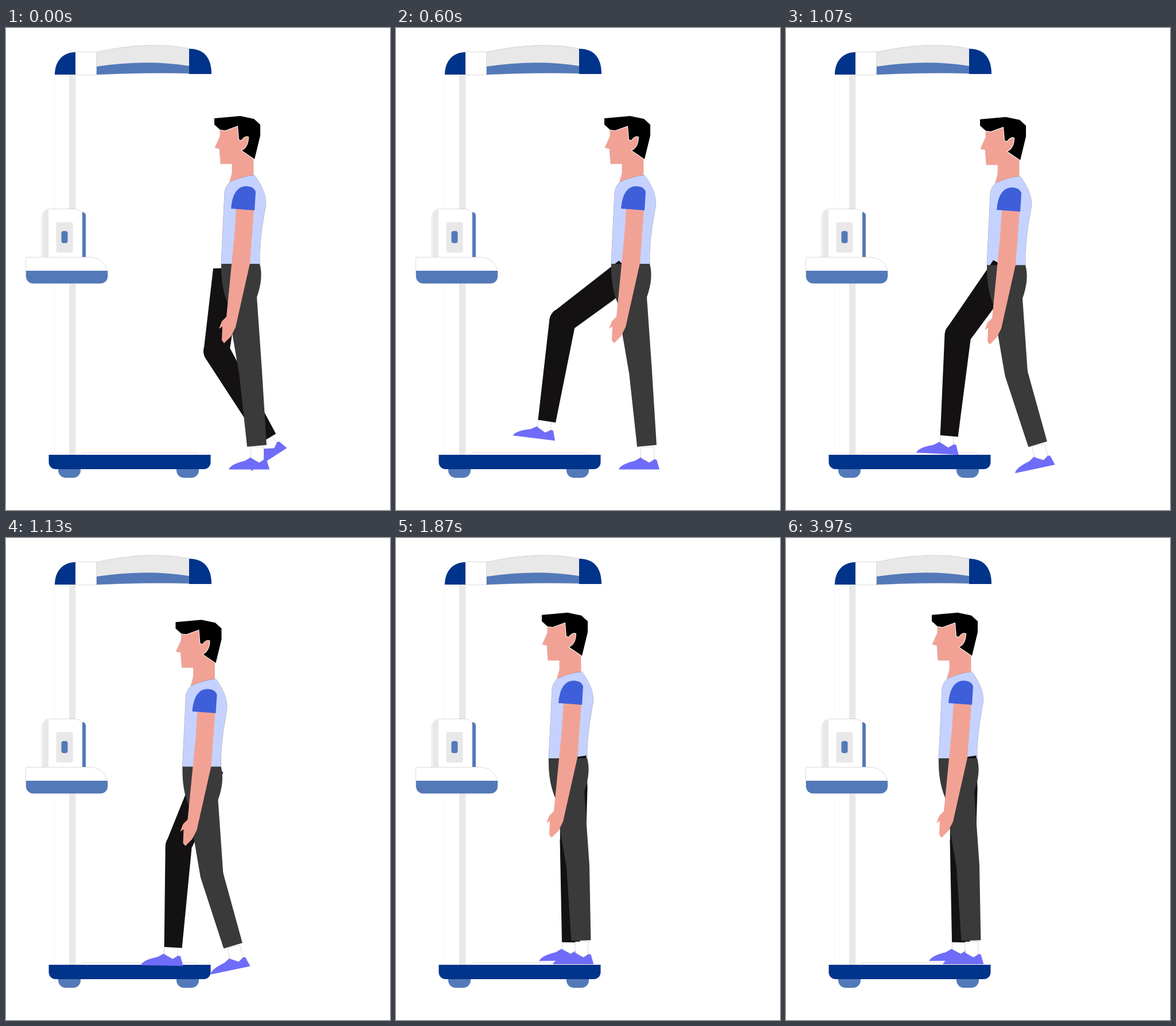
These frames come from a looping animation (669 by 838 pixels, 4010 ms). An HTML page with a canvas:

```html
<!DOCTYPE html>
<html lang="en">
<head>
<meta charset="utf-8">
<title>Stepping onto the scale</title>
<style>
html, body { margin: 0; width: 100%; height: 100%; overflow: hidden; background: #fff; }
canvas { display: block; }
</style>
</head>
<body>
<canvas id="stage" width="669" height="838"></canvas>
<script>
const ctx = document.getElementById('stage').getContext('2d');
const LOOP = 4010, RAD = Math.PI / 180;
const NAVY = '#00338a', BLUE = '#5379b9', GREY = '#e8e8e8', LINE = '#999';
const SKIN = '#f2a294', BLACK = '#131112', TROUSER = '#3a3a3a', SHOE = '#6f6cfa';

// Easing over the span from a to b, each running 0 to 1
const span = (t, a, b) => Math.min(1, Math.max(0, (t - a) / (b - a)));
const easeIn = (t, a, b, power) => span(t, a, b) ** power;
const easeOut = (t, a, b, power) => 1 - (1 - span(t, a, b)) ** power;
const smooth = (t, a, b) => {
  const u = span(t, a, b);
  return u * u * (3 - 2 * u);
};

function shape(d, fill, stroke, width = 0.7) {
  const p = new Path2D(d);
  if (stroke) {
    ctx.strokeStyle = stroke;
    ctx.lineWidth = width;
    ctx.stroke(p);
  }
  ctx.fillStyle = fill;
  ctx.fill(p);
}
function box(x, y, w, h, radius, fill, stroke) {
  const p = new Path2D();
  p.roundRect(x, y, w, h, radius);
  shape(p, fill, stroke);
}
function at(x, y, deg, draw) {
  ctx.save();
  ctx.translate(x, y);
  ctx.rotate(deg * RAD);
  draw();
  ctx.restore();
}
// Tapered lower leg hanging from a rounded knee
function shin(length, knee, ankle, fill) {
  shape(`M${-knee} 0L${-ankle} ${length}H${ankle}L${knee} 0A${knee} ${knee} 0 0 0 ${-knee} 0Z`, fill);
}

function machine() {
  box(85, 81, 36, 661, 0, '#fff', '#e6e6e6');
  box(110, 81, 11, 661, 0, GREY);

  box(121, 42, 37, 39, 0, '#fff', LINE);
  shape('M158 42Q250 22 319 36V79Q240 77 158 81Z', GREY, LINE);
  shape('M158 67Q245 54 319 66V79Q240 77 158 81Z', BLUE);
  shape('M121 42C100 42 85 57 85 81H121Z', NAVY);
  shape('M319 36C345 36 358 52 358 80H319Z', NAVY);

  box(63, 315, 70, 84, [12, 12, 0, 0], '#fff', LINE);
  box(64, 316, 10, 82, [10, 0, 0, 0], GREY);
  box(133, 320, 6, 78, [0, 6, 0, 0], BLUE);
  box(87.5, 337.5, 29, 53, 3, GREY);
  box(96.5, 353, 11, 21, 4, BLUE);
  box(35, 399, 142, 45, [0, 29, 12, 12], '#fff', LINE);
  box(35, 422, 142, 22, [0, 0, 12, 12], BLUE);

  for (const x of [91, 297]) box(x, 762, 39, 20, [0, 0, 13, 13], BLUE);
  box(133, 738.5, 198, 5, 0, '#fff', LINE);
  box(74.5, 742, 282, 25, [0, 0, 12, 12], NAVY);
}

function foot() {
  shape('M-49 41Q-46 32 -21 26L-9 19L17 24L22 41Z', SHOE);
  shape('M-10 2H12V24L4 29L-10 21Z', '#fff', LINE);
}

function farLeg(x, y, thigh, calf) {
  const knee = new DOMPoint(-24, 118).matrixTransform(new DOMMatrix().rotate(thigh));
  at(x + knee.x, y + knee.y, calf, () => {
    at(-5, 167, -2, () => { ctx.scale(1.04, 1); foot(); });
    shin(176, 23, 15.5, BLACK);
  });
  at(x, y, thigh, () => shape('M-30 -26L-47 120L-1 114L12 30L17 -27Z', BLACK));
}

function head() {
  shape('M373 176V188L364 208L372 210L374 236H394V252L389 270H412L431 260V226L412 212Q426 208 424 188L404 168Z', SKIN, '#a87870', 0.5);
  shape('M363 157L408 153L432 158L443 168V187L433 228L411 213Q423 207 423 189Q416 186 410 195L406 194L404 170L382 178L373 177L363 168Z', '#000', '#fff', 2);
}

function shirt() {
  shape('M390 268Q383 274 381 285L375 411H442Q440 375 451 316Q458 290 433 256Q412 258 390 268Z', '#c5d2ff', '#778');
}

function nearLeg(calf, tilt) {
  at(426, 598, calf, () => {
    shin(129, 20, 17, TROUSER);
    at(0, 129, tilt - calf, foot);
  });
  shape('M375 410H442Q449 434 437 468L446 597L406 600L394 530L386 478Q374 450 375 410Z', TROUSER);
}

function arm() {
  shape('M401 313L432 315L425 409L400 520L392 536L380 548L376 543L377 519L371 523L376 510L384 502L398 360Z', SKIN);
  shape('M392 314Q395 276 418 275Q432 275 435 285L433 317Z', '#3e5fd9');
}

function draw(t) {
  const lift = smooth(t, 0, 580), kick = smooth(t, 250, 680);
  const lean = easeIn(t, 570, 1070, 5);
  const step = easeOut(t, 1070, 1560, 5.4), settle = easeOut(t, 1070, 1560, 3.4);
  const follow = smooth(t, 1100, 1560);

  const x = -24 * lean - 85 * step, y = 2.5 * lean - 29.5 * step;
  const tilt = 12 * (follow - lean);

  ctx.fillStyle = '#fff';
  ctx.fillRect(0, 0, 669, 838);
  machine();
  at(x, y * 0.86, 0, () => { head(); shirt(); });
  farLeg(
    391 - 15 * lean - 58 * settle,
    444 - 3 * lean - 34 * settle,
    45.4 * lift - 17.4 * lean - 35 * settle,
    -30.7 + 43.5 * kick - 7.8 * lean - 3.7 * step
  );
  at(x, y, 0, () => { nearLeg(tilt - 4.9 + 2.5 * follow, tilt); arm(); });
}

function tick() {
  draw(performance.now() % LOOP);
  requestAnimationFrame(tick);
}
tick();
</script>
</body>
</html>
```
